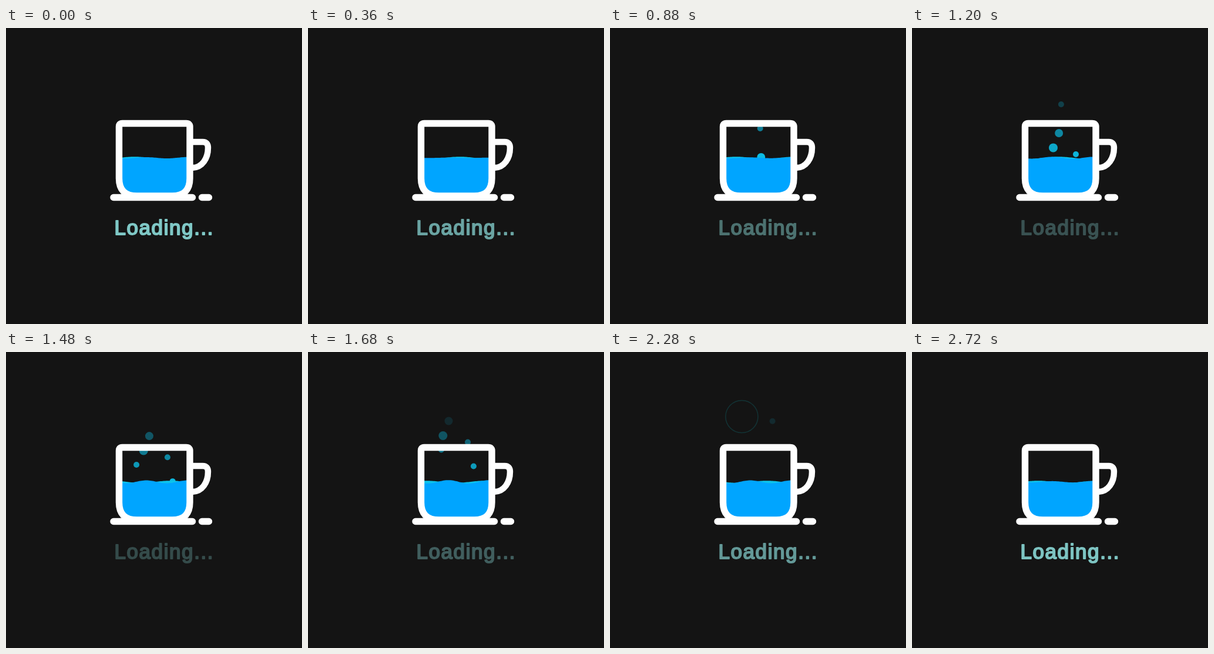
Animation of 504 by 504 pixels, one loop 2760 ms. Source, as an HTML page:

```html
<!DOCTYPE html>
<html lang="en">
<head>
<meta charset="utf-8">
<title>Loading</title>
<style>
  html, body { margin: 0; width: 100%; height: 100%; overflow: hidden; background: #141414; }
  svg { display: block; width: 100%; height: 100%; }
  .cup { fill: none; stroke: #fff; stroke-width: 11.4; stroke-linecap: round; stroke-linejoin: round; }
  .handle { stroke-width: 10.4; }
  .label {
    font: 35px "Liberation Sans", Arial, sans-serif;
    letter-spacing: 1.6px;
    fill: #80c9c7; stroke: #80c9c7; stroke-width: 2; stroke-linejoin: round;
    animation: fade 2760ms linear infinite;
  }
  @keyframes fade { 50% { opacity: .25; } }
</style>
</head>
<body>
<svg viewBox="0 0 504 504">
  <defs>
    <clipPath id="inside">
      <path d="M195 160H311V258Q311 284 284 284H222Q195 284 195 258Z"/>
    </clipPath>
  </defs>
  <g id="bubbles" fill="#0cc0e8"></g>
  <circle id="ring" fill="none" stroke="#10c0cc" stroke-width="1.5" opacity=".18"/>
  <g clip-path="url(#inside)">
    <path id="back" fill="#0cc4ec"/>
    <path id="front" fill="#00a5ff"/>
  </g>
  <g class="cup">
    <path d="M198 162.5H307Q313 162.5 313 168V256Q313 286 283 286H223Q192.5 286 192.5 256V168Q192.5 162.5 198 162.5Z"/>
    <path class="handle" d="M317 194H335Q344 194 344 204C344 222 334 238 317 238"/>
    <path d="M183 288.5H317.5M333.5 288.5H345.5"/>
  </g>
  <text class="label" x="184.4" y="352.2">Loading...</text>
</svg>
<script>
const LOOP = 2760;
const LIFE = 900;    // ms from a bubble's birth to its end
const RISE = 0.128;  // px per ms
const LEVEL = 221;
const TAU = 2 * Math.PI;
const $ = id => document.getElementById(id);

function set(el, attrs) {
  for (const k in attrs) el.setAttribute(k, attrs[k]);
}

// Rocks in place, growing and shrinking once per loop
function frontWave(x, t) {
  const size = 1.6 - 1.4 * Math.cos(TAU * (t - 500) / LOOP);
  return LEVEL - size * Math.cos(TAU * (x - 239) / 70);
}

// Travels right, three wavelengths per loop
function backWave(x, t) {
  return LEVEL - 1.8 * Math.cos(TAU * ((x - 219) / 100 - 3 * t / LOOP));
}

function drawWave(id, wave, t) {
  let d = "M195 290";
  for (let x = 195; x <= 311; x += 2) d += `L${x} ${wave(x, t).toFixed(2)}`;
  $(id).setAttribute("d", d + "L311 290Z");
}

const bubbles = [
  { x: 258, drift: -5, born: 466, r: 5 },
  { x: 258, drift: -20, born: 848, r: 7 },
  { x: 244, drift: -20, born: 1043, r: 7.5 },
  { x: 280, drift: -13, born: 1130, r: 5 },
  { x: 216, drift: 22, born: 1230, r: 5 },
  { x: 284, drift: -8, born: 1450, r: 5 }
];
for (const b of bubbles) {
  b.dot = document.createElementNS("http://www.w3.org/2000/svg", "circle");
  $("bubbles").append(b.dot);
}

function drawBubble({ dot, x, drift, born, r }, t) {
  const f = (t - born) / LIFE;
  const opacity = f < 0 || f > 1 ? 0 : (1 - f) ** 0.8;
  set(dot, { cx: x + drift * f, cy: 224 - RISE * (t - born), r, opacity });
}

// The third bubble bursts into a ring
function drawRing(t) {
  const f = (t - bubbles[2].born - LIFE) / 350;
  const visibility = f >= 0 && f <= 1 ? "visible" : "hidden";
  set($("ring"), { cx: 224.4, cy: 110, r: 27.6 - 20 * Math.max(0, 1 - f) ** 2, visibility });
}

let start;
function draw(now) {
  start ??= now;
  const t = (now - start) % LOOP;
  drawWave("back", backWave, t);
  drawWave("front", frontWave, t);
  bubbles.forEach(b => drawBubble(b, t));
  drawRing(t);
  requestAnimationFrame(draw);
}
requestAnimationFrame(draw);
</script>
</body>
</html>
```
